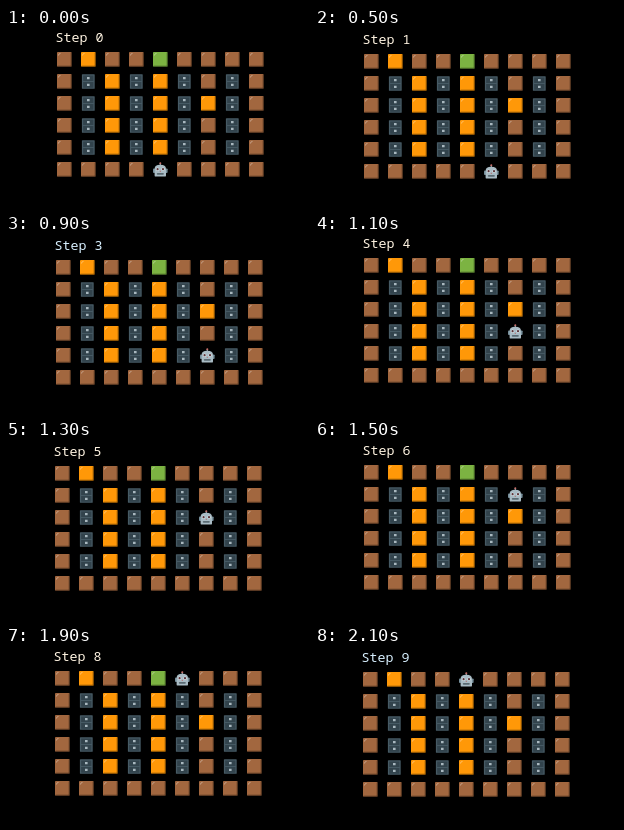
Write an HTML page that moves like this. It is 303 px wide and 178 px high and loops after 2600 ms.

```html
<!DOCTYPE html>
<html lang="en">
<head>
<meta charset="utf-8">
<title>Robot grid walk</title>
<style>
html, body { margin: 0; height: 100%; overflow: hidden; background: #000; }
svg { display: block; width: 100%; height: 100%; }
text { font: 500 13.33px "Noto Sans Mono", "DejaVu Sans Mono", monospace; white-space: pre; }
</style>
</head>
<body>
<svg viewBox="0 0 303 178">
  <defs>
    <g id="tile">
      <rect width="14.7" height="14.7" rx=".8"/>
      <path d="M14.2 .5v13.7H.5" fill="none" stroke="#000" stroke-opacity=".4"/>
      <path d="M1.4 3.2q0-1.8 1.8-1.8" fill="none" stroke="#fff" stroke-opacity=".35" stroke-linecap="round"/>
    </g>
    <use id="brown" href="#tile" fill="#a2673f"/>
    <use id="orange" href="#tile" fill="#ff9808"/>
    <use id="green" href="#tile" fill="#7cb342"/>
    <g id="cabinet">
      <rect x=".9" y=".2" width="12.8" height="14.6" rx=".6" fill="#465a64"/>
      <path d="M2.2 1.4h10.2v5.6H2.2zM2.2 8.1h10.2v5.6H2.2z" fill="#32434c"/>
      <path d="M6 3h2.6v2.2H6zM6 9.7h2.6v2.2H6z" fill="#a9b8bf"/>
    </g>
    <g id="robot">
      <path d="M7.3 1v2.5" stroke="#90a4ae" stroke-width="1.2"/>
      <circle cx="7.3" cy="1.2" r="1" fill="#c9706a"/>
      <rect y="6.4" width="2.2" height="4.6" rx=".9" fill="#78909c"/>
      <rect x="12.4" y="6.4" width="2.2" height="4.6" rx=".9" fill="#78909c"/>
      <path d="M1.6 13.4V7q0-4.2 5.7-4.2T13 7v6.4q0 1.2-1.2 1.2h-9q-1.2 0-1.2-1.2z" fill="#a9bbc4"/>
      <circle cx="4.6" cy="7.2" r="1.6" fill="#dce5e9"/>
      <circle cx="10" cy="7.2" r="1.6" fill="#dce5e9"/>
      <circle cx="4.6" cy="7.2" r="1.1" fill="#5b3237"/>
      <circle cx="10" cy="7.2" r="1.1" fill="#5b3237"/>
      <path d="M7.3 8.4l.8 1.4H6.5z" fill="#b5605c"/>
      <rect x="3.8" y="11" width="7" height="1.8" rx=".8" fill="#5a6b73"/>
    </g>
  </defs>
  <rect width="303" height="178"/>
  <g id="scene"><text id="label" x="-.5" y="9.3"></text></g>
</svg>
<script>
const map = [
  "bobbgbbbb",
  "bcococbcb",
  "bcocococb",
  "bcococbcb",
  "bcococbcb",
  "bbbbbbbbb"
];
const kinds = { b: "brown", o: "orange", g: "green", c: "cabinet" };
// column, row of the robot at each step
const path = [[4,5], [5,5], [6,5], [6,4], [6,3], [6,2], [6,1], [6,0], [5,0], [4,0]];
// the whole view jitters a little at each step
const left = [50, 48, 48, 49, 48, 48, 48, 47, 48, 47];
const above = [5, 7, 5, 7, 5, 7, 6, 8, 6, 7];

const scene = document.getElementById("scene");
const label = document.getElementById("label");

function place(use, kind, col, row) {
  use.setAttribute("href", "#" + kind);
  use.setAttribute("x", 1 + col * 24);
  use.setAttribute("y", 19 + row * 22);
}

const cells = map.map((line, row) => [...line].map((c, col) => {
  const use = document.createElementNS("http://www.w3.org/2000/svg", "use");
  place(use, kinds[c], col, row);
  return scene.appendChild(use);
}));

let shown = -1;

function show(step) {
  if (shown >= 0) {
    const [c, r] = path[shown];
    place(cells[r][c], kinds[map[r][c]], c, r);
  }
  const [col, row] = path[step];
  place(cells[row][col], "robot", col, row);
  scene.setAttribute("transform", `translate(${left[step]} ${above[step]})`);
  label.textContent = "Step " + step;
  label.setAttribute("fill", left[step] % 2 ? "#d8f0ff" : "#fff4e2");
  shown = step;
}

function frame(now) {
  const t = now % 2600;
  const step = Math.min(9, Math.max(0, Math.floor((t - 300) / 200)));
  if (step !== shown) show(step);
  requestAnimationFrame(frame);
}

show(0);
requestAnimationFrame(frame);
</script>
</body>
</html>
```
